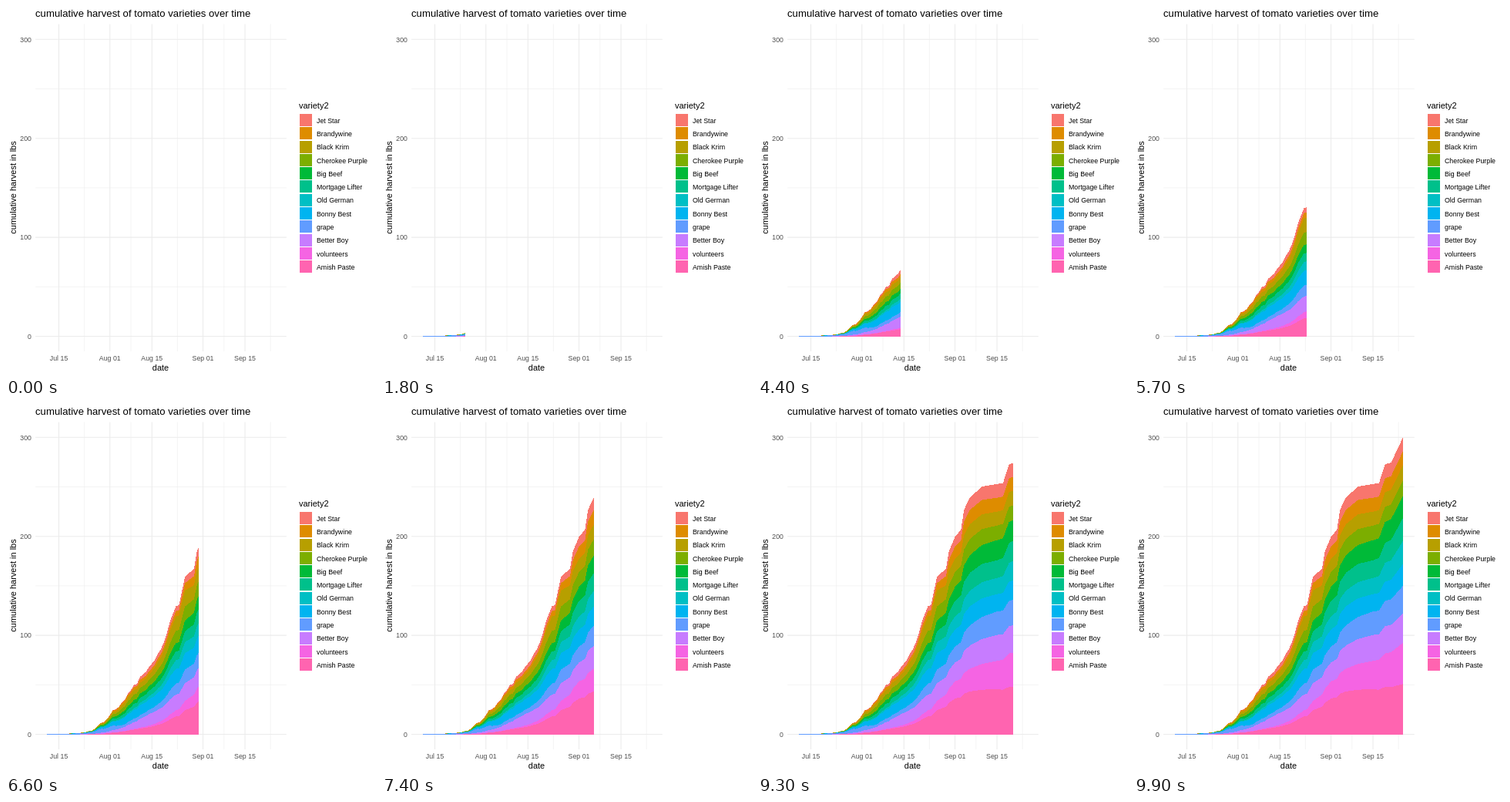
These frames come from a looping animation (480x480 px, 10 s). An HTML page:

```html
<!DOCTYPE html>
<html lang="en">
<head>
<meta charset="utf-8">
<title>Cumulative harvest</title>
<style>
  html, body { margin: 0; width: 100%; height: 100%; overflow: hidden; background: #fff; }
  svg { display: block; width: 480px; height: 480px; }
  text { font-family: "Liberation Sans", Arial, Helvetica, sans-serif; }
</style>
</head>
<body>
<svg id="chart" viewBox="0 0 480 480"></svg>
<script>
const FRAMES = 100, FRAME_MS = 100, DAYS = 76;
const LEFT = 53, DAY_W = 296 / DAYS, BASE = 428.7;
const PANEL = { x0: 38.2, x1: 363.8, y0: 23.5, y1: 448 };

const VARIETIES = [
  ["Jet Star", "#F8766D"], ["Brandywine", "#DE8C00"], ["Black Krim", "#B79F00"],
  ["Cherokee Purple", "#7CAE00"], ["Big Beef", "#00BA38"], ["Mortgage Lifter", "#00C08B"],
  ["Old German", "#00BFC4"], ["Bonny Best", "#00B4F0"], ["grape", "#619CFF"],
  ["Better Boy", "#C77CFF"], ["volunteers", "#F564E3"], ["Amish Paste", "#FF64B0"]
];

// Stack height: a slow start, then daily picks, then sparse [day, height] picks
const DAILY = [
  3.2, 4.5, 5, 7.5, 11.5, 15, 15.7, 20, 25, 31.5, 32.5, 36, 41.5, 45, 53,
  57.5, 64, 65.5, 74.5, 78, 81, 87.5, 92, 97, 105, 110.5, 120, 132, 146.5
];
const LATE = [
  [43, 166.5], [44, 167.5], [46, 204.5], [49, 215], [50, 237.5], [52, 256.5], [54, 265.5],
  [55, 291.5], [57, 307.5], [61, 321.5], [66, 325], [68, 326], [70, 350.5], [72, 352.5], [76, 385.5]
];
const SLOW_DAYS = 13;
const totals = [
  ...Array.from({ length: SLOW_DAYS }, (_, d) => [d, .4 + d * d / 72]),
  ...DAILY.map((h, i) => [SLOW_DAYS + i, h]),
  ...LATE
];

// Relative layer thickness, top to bottom, at a few days; only grape at first
const MIX = [
  [0, VARIETIES.map(([name]) => name === "grape" ? 1 : 0)],
  [25, [.5, 3.5, 4.5, 5.5, 4, 4, 1.5, 9, 3.5, 5, .5, 4]],
  [34, [6, 4, 7, 8, 6, 7, 4, 13.5, 5.5, 15, 2, 9.5]],
  [44, [6, 7, 19, 16, 11, 11, 12, 18.5, 14.5, 20, 8.5, 24]],
  [52, [13, 16, 17, 19, 18, 20, 17, 22, 20.5, 24.5, 22, 46.5]],
  [66, [18, 18, 18, 19, 26, 23, 21, 22.5, 30.5, 33.5, 37, 58.5]],
  [76, [18, 18, 20, 20, 28.5, 30, 29.5, 28.5, 36, 38, 53.5, 65.5]]
];

const svg = document.getElementById("chart");
const lerp = (a, b, t) => a + (b - a) * t;
const dayX = d => LEFT + d * DAY_W;

function add(tag, attrs, text) {
  const el = document.createElementNS("http://www.w3.org/2000/svg", tag);
  for (const k in attrs) el.setAttribute(k, attrs[k]);
  if (text) el.textContent = text;
  return svg.appendChild(el);
}

function label(text, x, y, size, fill, anchor = "start", extra = {}) {
  add("text", { x, y, "font-size": size, fill, "text-anchor": anchor, ...extra }, text);
}

// Heights of the layer tops above the baseline
function tops(day, total) {
  const i = Math.max(1, MIX.findIndex(m => m[0] >= day));
  const [d0, a] = MIX[i - 1], [d1, b] = MIX[i];
  const t = (day - d0) / (d1 - d0);
  const sum = list => list.reduce((s, v) => s + v, 0);
  const sa = sum(a), sb = sum(b);
  let h = total;
  return a.map((v, k) => {
    const top = h;
    h -= total * lerp(v / sa, b[k] / sb, t);
    return top;
  });
}

const knots = totals.map(([day, total]) => ({
  frame: Math.round(day / DAYS * (FRAMES - 1)),
  x: dayX(day),
  tops: tops(day, total)
}));

function gridLine(vertical, at, width) {
  const { x0, x1, y0, y1 } = PANEL;
  const d = vertical ? `M${at} ${y0}V${y1}` : `M${x0} ${at}H${x1}`;
  add("path", { d, stroke: "#EBEBEB", "stroke-width": width });
}

const valueY = v => 428.5 - v * 1.284;
const dates = [[4, "Jul 15"], [21, "Aug 01"], [35, "Aug 15"], [52, "Sep 01"], [66, "Sep 15"]];

[50, 150, 250].forEach(v => gridLine(false, valueY(v), .53));
dates.forEach(([d], i) => {
  const next = i < 4 ? dates[i + 1][0] : d + 17;
  gridLine(true, dayX((d + next) / 2), .53);
});
[0, 100, 200, 300].forEach(v => {
  gridLine(false, valueY(v), 1.07);
  label(String(v), 33, valueY(v) + 3.2, 8.8, "#4D4D4D", "end");
});
dates.forEach(([d, name]) => {
  gridLine(true, dayX(d), 1.07);
  label(name, dayX(d), 460, 8.8, "#4D4D4D", "middle");
});

const layers = VARIETIES.map(([, fill]) => add("path", { fill, "shape-rendering": "crispEdges" }));

label("cumulative harvest of tomato varieties over time", 38, 14, 13.2, "#000");
label("date", 200.5, 473, 11, "#000", "middle");
label("cumulative harvest in lbs", 0, 0, 11, "#000", "middle",
  { transform: "translate(13 235.5) rotate(-90)" });
label("variety2", 380, 133, 11, "#000");
VARIETIES.forEach(([name, fill], i) => {
  const y = 140 + i * 17.28;
  add("rect", { x: 381, y: Math.round(y), width: 16, height: 16, fill });
  label(name, 403, y + 11.7, 8.8, "#000");
});

function visible(frame) {
  const pts = knots.filter(k => k.frame <= frame);
  const a = pts[pts.length - 1], b = knots[pts.length];
  if (b && frame > a.frame) {
    const t = (frame - a.frame) / (b.frame - a.frame);
    pts.push({ x: lerp(a.x, b.x, t), tops: a.tops.map((v, i) => lerp(v, b.tops[i], t)) });
  }
  return pts;
}

// Each layer reaches the baseline; lower ones cover it
function draw(frame) {
  const pts = visible(frame);
  const end = pts[pts.length - 1].x;
  layers.forEach((el, i) => {
    const edge = pts.map(p => `L${p.x.toFixed(2)} ${(BASE - p.tops[i]).toFixed(2)}`).join("");
    el.setAttribute("d", frame ? `M${LEFT} ${BASE}${edge}L${end.toFixed(2)} ${BASE}Z` : "");
  });
}

const start = performance.now();
let shown = -1;
function tick() {
  const frame = Math.floor((performance.now() - start) / FRAME_MS) % FRAMES;
  if (frame !== shown) draw(shown = frame);
  requestAnimationFrame(tick);
}
tick();
</script>
</body>
</html>
```
